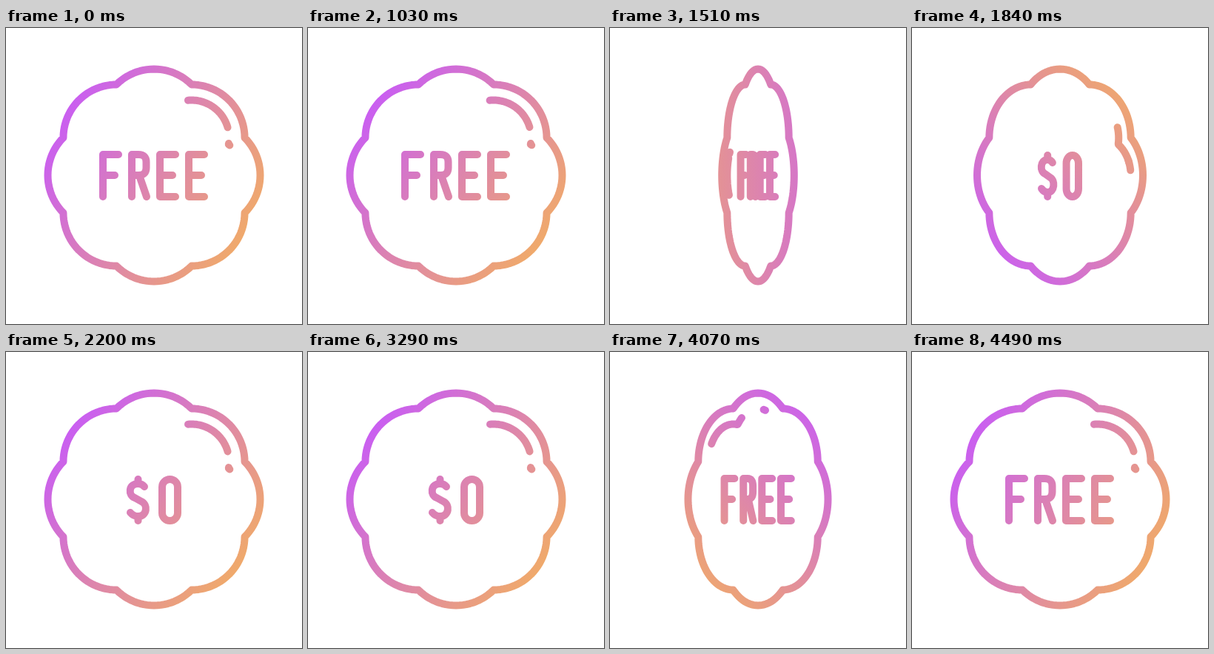
An HTML page with a canvas that plays this animation: 400x400 px, repeating every 4.52 s.

```html
<!DOCTYPE html>
<html lang="en">
<head>
<meta charset="utf-8">
<title>Free badge</title>
<style>
html, body { margin: 0; width: 100%; height: 100%; overflow: hidden; background: #fff; }
canvas { display: block; width: 100vmin; height: 100vmin; margin: auto; }
</style>
</head>
<body>
<canvas id="stage" width="400" height="400"></canvas>
<script>
const canvas = document.getElementById('stage');
const ctx = canvas.getContext('2d');
const LOOP = 4520;
const CX = 200, CY = 199;
const LOBE_DIST = 71.5;

const FREE = new Path2D(
  'M131 228V171H152M131 199H147' +
  'M170 228V171H179Q189.500 171 189.500 181V189Q189.500 199 179 199H170M180 199L190 228' +
  'M229 171H208V228H229M208 199H225' +
  'M268 171H247V228H268M247 199H264');
const ZERO = new Path2D(
  'M187 182Q184 178 178.500 178C165 178 165 194 174 197L183 202C192 206 191 222 178.500 222Q172 222 168 217' +
  'M178.500 172V178M178.500 222V228' +
  'M211 182.500A10.500 10.500 0 0 1 232 182.500V217.500A10.500 10.500 0 0 1 211 217.500Z');

const clamp = x => Math.min(1, Math.max(0, x));
const smooth = x => x * x * (3 - 2 * x);
const easeInOut = (x, n) => x < 0.5 ? Math.pow(2 * x, n) / 2 : 1 - Math.pow(2 - 2 * x, n) / 2;

// Eight-lobed closed curve, clockwise from the top, squeezed horizontally
function flower(r, sx) {
  const step = Math.PI / 4, n = 24, pts = [];
  const half = step / 2 + Math.asin(LOBE_DIST / r * Math.sin(step / 2));
  for (let i = 0; i <= 8 * n; i++) {
    const j = i + n / 2, k = Math.floor(j / n);
    const axis = k * step - Math.PI / 2;
    const a = axis + ((j % n) / n * 2 - 1) * half;
    pts.push([
      CX + sx * (LOBE_DIST * Math.cos(axis) + r * Math.cos(a)),
      CY + LOBE_DIST * Math.sin(axis) + r * Math.sin(a)
    ]);
  }
  return pts;
}

function strokePoints(pts, closed) {
  ctx.beginPath();
  pts.forEach(p => ctx.lineTo(p[0], p[1]));
  if (closed) ctx.closePath();
  ctx.stroke();
}

// Strokes the part between two fractions of the whole length
function strokePart(pts, from, to) {
  const sums = [0];
  for (let i = 1; i < pts.length; i++) {
    sums.push(sums[i - 1] + Math.hypot(pts[i][0] - pts[i - 1][0], pts[i][1] - pts[i - 1][1]));
  }
  const total = sums[sums.length - 1];
  const at = u => {
    const d = (u - Math.floor(u)) * total;
    let i = 1;
    while (i < sums.length - 1 && sums[i] < d) i++;
    const f = (d - sums[i - 1]) / (sums[i] - sums[i - 1]);
    return [0, 1].map(c => pts[i - 1][c] + f * (pts[i][c] - pts[i - 1][c]));
  };
  const part = [];
  for (let i = 0; i <= 40; i++) part.push(at(from + (to - from) * i / 40));
  strokePoints(part, false);
}

function gradient(deg) {
  const dx = 150 * Math.cos(deg * Math.PI / 180);
  const dy = 150 * Math.sin(deg * Math.PI / 180);
  const g = ctx.createLinearGradient(CX - dx, CY - dy, CX + dx, CY + dy);
  g.addColorStop(0, '#c95ef2');
  g.addColorStop(1, '#f0aa6a');
  return g;
}

// 0 shows FREE, 1 shows $0; the way back runs in reverse
function progress(ms) {
  return ms < 3275 ? clamp((ms - 1000) / 1200) : 1 - clamp((ms - 3275) / 1210);
}

function draw(ms) {
  const t = progress(ms);
  const turn = smooth(t);
  const sx = Math.abs(Math.cos(Math.PI * turn));

  ctx.clearRect(0, 0, 400, 400);
  ctx.lineWidth = 10;
  ctx.lineCap = ctx.lineJoin = 'round';
  ctx.strokeStyle = gradient(t > 0 ? 37 + 360 * turn : 30);

  strokePoints(flower(72, sx), true);

  const inner = flower(51, sx);
  const arc = easeInOut(clamp(t + 0.025), 3);
  const dot = easeInOut(clamp(t + 0.042), 4);
  strokePart(inner, 0.068 - arc, 0.158 - arc);
  strokePart(inner, 0.186 - dot, 0.190 - dot);

  const label = new Path2D();
  label.addPath(t < 0.5 ? FREE : ZERO, new DOMMatrix([sx, 0, 0, 1, CX * (1 - sx), 0]));
  ctx.stroke(label);
}

function tick() {
  draw(performance.now() % LOOP);
  requestAnimationFrame(tick);
}
tick();
</script>
</body>
</html>
```
